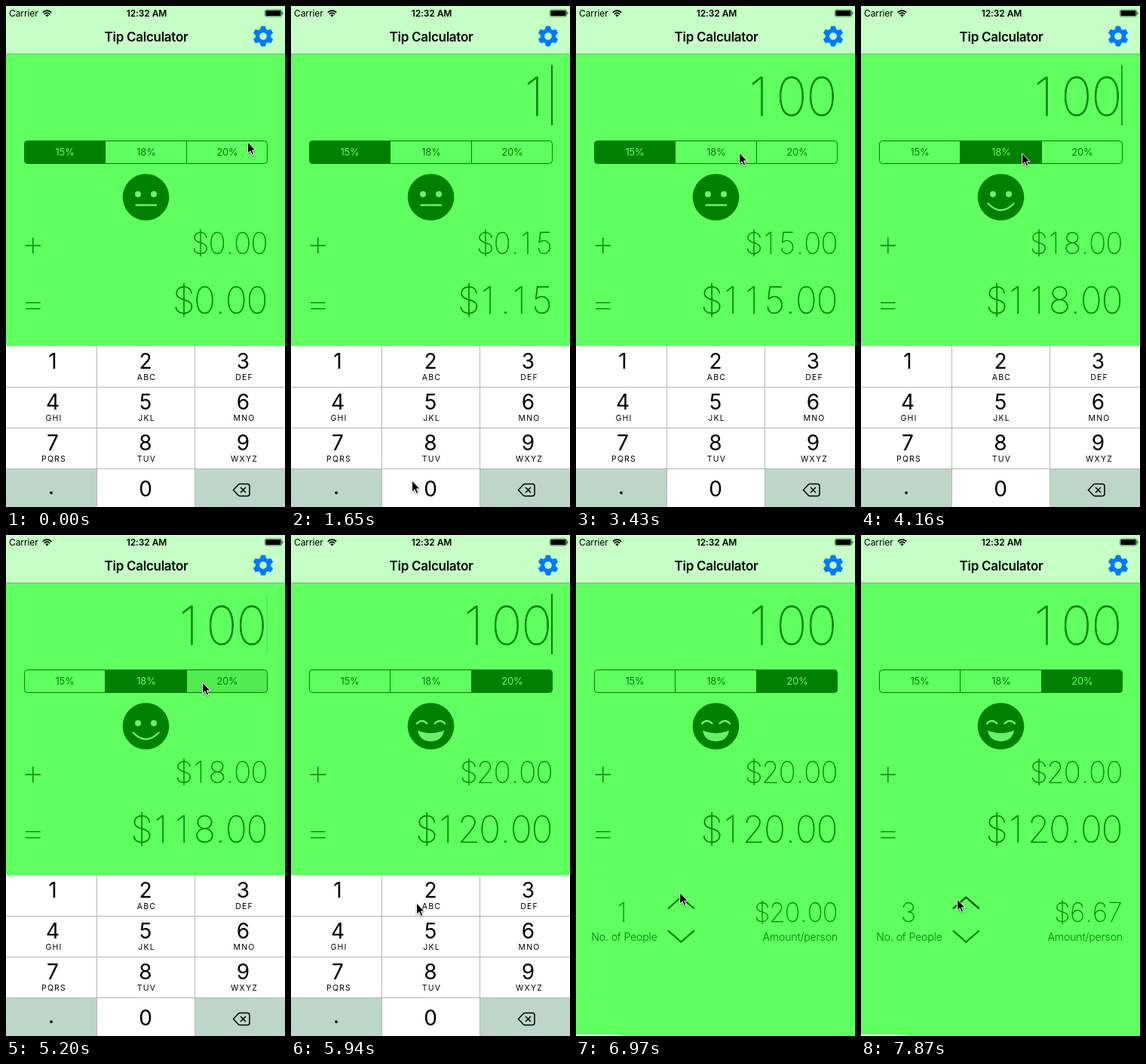
These frames come from a looping animation (370 by 663 pixels, 8 s). An HTML page:

```html
<!DOCTYPE html>
<html lang="en">
<head>
<meta charset="utf-8">
<title>Tip Calculator</title>
<style>
  html, body { margin: 0; width: 100%; height: 100%; overflow: hidden; background: #5eff5e; }
  svg { display: block; width: 370px; height: 663px; font-family: Inter, Roboto, sans-serif; }
  .thin {
    font-weight: 100; font-optical-sizing: none; text-anchor: middle;
    fill: #008000; stroke: #008000; stroke-width: .011em;
  }
  .mid { text-anchor: middle; }
  .line { fill: none; stroke: #008000; }
  .face { fill: none; stroke: #69f069; stroke-width: 2.4; stroke-linecap: round; }
</style>
</head>
<body>
<svg id="stage" viewBox="0 0 370 663"></svg>
<script>
const LOOP = 8000;
const GREEN = '#008000', BACK = '#5eff5e', SHADE = '#bdd6c8';
const stage = document.getElementById('stage');

function add(parent, tag, attrs = {}, text = '') {
  const el = document.createElementNS('http://www.w3.org/2000/svg', tag);
  set(el, attrs);
  el.textContent = text;
  return parent.appendChild(el);
}
function set(el, attrs) {
  for (const k in attrs) el.setAttribute(k, attrs[k]);
}
const group = (parent, attrs) => add(parent, 'g', attrs);
const path = (parent, d, attrs) => add(parent, 'path', { d, ...attrs });
const rect = (parent, x, y, width, height, fill, more) =>
  add(parent, 'rect', { x, y, width, height, fill, ...more });
const label = (parent, text, x, y, size, attrs) =>
  add(parent, 'text', { x, y, 'font-size': size, ...attrs }, text);
const show = (el, on) => { el.style.display = on ? '' : 'none'; };

// Right-aligned figures in fixed cells; the 1 sits left of its cell's centre
function figure(right, y, em) {
  const el = add(stage, 'text', { y, class: 'thin', 'font-size': em * .97 });
  const width = c => em * (c === '.' ? .278 : .556);
  const shift = c => (c === '1' ? -.05 * em : 0);
  return text => {
    let x = right - [...text].reduce((sum, c) => sum + width(c), 0);
    const xs = [...text].map(c => {
      x += width(c);
      return (x - width(c) / 2 + shift(c)).toFixed(1);
    });
    el.setAttribute('x', xs.join(' '));
    el.textContent = text;
  };
}

rect(stage, 0, 0, 370, 663, BACK);

// Status and title bars
rect(stage, 0, 0, 370, 63, '#c5ffc5');
rect(stage, 0, 63, 370, 1, '#6cbf6c');
label(stage, 'Carrier', 4, 13.5, 12, { 'letter-spacing': -.1 });
path(stage, 'M48.8 8.6Q54.5 3.4 60.2 8.6M50.8 10.8Q54.5 7.4 58.2 10.8',
  { fill: 'none', stroke: '#000', 'stroke-width': 1.7 });
path(stage, 'M52.4 12.2Q54.5 10.4 56.6 12.2L54.5 14.4Z');
label(stage, '12:32 AM', 186.5, 13.5, 12, { class: 'mid', 'font-weight': 600, 'letter-spacing': -.1 });
rect(stage, 343.5, 5, 22, 9, 'none', { rx: 2, stroke: '#3c4e3c', 'stroke-width': .8 });
rect(stage, 344.5, 6, 20, 7, '#000', { rx: 1 });
path(stage, 'M366.5 7.5Q368.5 9.5 366.5 11.5Z');
label(stage, 'Tip Calculator', 186, 47, 17, { class: 'mid', 'font-weight': 600, 'letter-spacing': -.28 });

const gear = group(stage, { transform: 'translate(341 40)', fill: '#007aff' });
add(gear, 'circle', { r: 7.5, fill: 'none', stroke: '#007aff', 'stroke-width': 5.4 });
for (let a = 0; a < 360; a += 60)
  path(gear, 'M-4.2 -8.8L-3.2 -12.6Q-3 -13.5 -2.2 -13.5H2.2Q3 -13.5 3.2 -12.6L4.2 -8.8Z',
    { transform: `rotate(${a})` });

// Bill amount
const amount = figure(346, 144.5, 72);
const caret = rect(stage, 345, 78, 2, 80, GREEN);

// Tip choice
const segX = [24.5, 131.5, 239.5, 346.5];
const segs = ['15%', '18%', '20%'].map((text, i) => {
  const l = segX[i], r = segX[i + 1];
  const d = i === 0 ? `M${r} 178.5V208.5H${l + 4}q-4 0 -4 -4V182.5q0 -4 4 -4Z`
    : i === 2 ? `M${l} 178.5V208.5H${r - 4}q4 0 4 -4V182.5q0 -4 -4 -4Z`
    : `M${l} 178.5H${r}V208.5H${l}Z`;
  return {
    box: path(stage, d, { stroke: GREEN }),
    text: label(stage, text, [78, 186, 293.5][i], 198, 13, { class: 'mid', 'letter-spacing': -.2 })
  };
});

// Mood
add(stage, 'circle', { cx: 185.5, cy: 253, r: 30.8, fill: GREEN });
const eyes = group(stage, { fill: '#69f069' });
for (const cx of [175, 196]) add(eyes, 'circle', { cx, cy: 249, r: 4 });
const moods = [
  'M172.5 263.5H199',
  'M168.5 261.5Q185.5 279 202.5 261.5',
  'M167 249.5Q173.5 242.5 180.5 249.5M190.5 249.5Q197.5 242.5 204 249.5'
].map(d => {
  const g = group(stage, { class: 'face' });
  path(g, d);
  return g;
});
path(moods[2], 'M168 258.5Q185.5 266 203 258.5Q200.5 273 185.5 273Q170.5 273 168 258.5Z',
  { fill: '#69f069', stroke: 'none' });

// Totals
path(stage, 'M25.5 317H46M35.8 306.5V327.5M26 392.6H45.5M26 400.6H45.5',
  { class: 'line', 'stroke-width': 1.4 });
const tip = figure(347, 328.3, 40);
const total = figure(347, 407.3, 50);

// Split
const people = figure(73, 512.3, 36);
const share = figure(347, 512.3, 36);
label(stage, 'No. of People', 64, 537, 14, { class: 'mid', fill: GREEN, 'font-weight': 300, 'letter-spacing': -.1 });
label(stage, 'Amount/person', 347, 537, 14,
  { 'text-anchor': 'end', fill: GREEN, 'font-weight': 300, 'letter-spacing': -.1 });
const up = path(stage, 'M122 494.5L139.3 479.5L156.8 494.5', { class: 'line', 'stroke-width': 2.3 });
path(stage, 'M122 523.5L139.3 538.5L156.8 523.5', { class: 'line', 'stroke-width': 2.3 });
path(stage, 'M0 661H44Q56 661.5 62 663H0Z', { fill: '#fff' });

// Keypad
const pad = group(stage);
rect(pad, 0, 450, 370, 213, '#fff');
rect(pad, 0, 613, 120, 50, SHADE);
rect(pad, 251, 613, 119, 50, SHADE);
const zero = rect(pad, 121, 613, 129, 50, SHADE);
for (const y of [504, 558, 612]) rect(pad, 0, y, 370, 1, '#b4b8b6');
for (const x of [120, 250]) rect(pad, x, 450, 1, 213, '#b4b8b6');
const keyX = [62, 185, 314.5];
['', 'ABC', 'DEF', 'GHI', 'JKL', 'MNO', 'PQRS', 'TUV', 'WXYZ'].forEach((text, i) => {
  const x = keyX[i % 3], y = 479.5 + 54 * Math.floor(i / 3);
  label(pad, i + 1, x, y, 28, { class: 'mid' });
  label(pad, text, x + 1.5, y + 15.5, 10.5, { class: 'mid', 'letter-spacing': 1.2 });
});
label(pad, '0', 185, 649, 28, { class: 'mid' });
label(pad, '.', 60, 646, 28, { class: 'mid' });
path(pad, 'M301.5 640.5L308 633.5Q309 632.5 310.5 632.5H320Q323 632.5 323 635.5V645.5Q323 648.5 320 648.5H310.5Q309 648.5 308 647.5ZM311 637L318 644M318 637L311 644',
  { fill: 'none', stroke: '#000', 'stroke-width': 1.5 });

const pointer = path(stage, 'M.5 0V15L4 11.8L6.3 17.2L8.8 16.1L6.5 10.9H11Z',
  { fill: '#000', stroke: '#fff', 'stroke-width': 1, style: 'filter:drop-shadow(0 1px 1px #0006)' });

// Bursts of screen updates: start, end, count
const bursts = [
  [300, 900, 5], [1200, 2100, 7], [2550, 2700, 2], [2990, 4010, 8],
  [4160, 4750, 5], [5050, 6080, 8], [6230, 7270, 8], [7420, 7870, 4]
];
const ticks = [0];
for (const [a, b, n] of bursts)
  for (let i = 0; i < n; i++) ticks.push(Math.round((a + (b - a) * i / (n - 1)) / 10) * 10);

const steps = [
  [0, { bill: '', seg: 0, press: -1, key: false, heads: 1, up: false }],
  [1200, { bill: '1' }],
  [1800, { key: true }],
  [1950, { bill: '10' }],
  [2100, { key: false }],
  [2550, { bill: '100', key: true }],
  [2700, { key: false }],
  [3720, { press: 1 }],
  [3860, { seg: 1, press: -1 }],
  [5050, { press: 2 }],
  [5340, { seg: 2, press: -1 }],
  [7420, { heads: 2, up: true }],
  [7570, { up: false }],
  [7720, { up: true }],
  [7870, { heads: 3 }]
];
const route = [
  [150, 320, 180], [750, 115, 533], [900, 99, 482], [1200, 99, 482], [1620, 160, 628],
  [2850, 160, 628], [3430, 216, 194], [3860, 212, 195], [4100, 212, 195], [4750, 260, 195],
  [5340, 260, 195], [5930, 166, 487], [6080, 164, 450], [6400, 164, 450], [7270, 127, 482]
];
const blink = [
  [300, 0], [420, 1], [2950, 1], [3120, 0], [3570, 0], [3720, 1], [4100, 1], [4300, 0],
  [4600, 0], [4700, 1], [5050, 1], [5220, 0], [5600, 0], [5750, 1], [6200, 1], [6300, 0]
];

function along(keys, t, ease = p => p) {
  const i = keys.findIndex(k => k[0] > t);
  if (i === 0) return keys[0].slice(1);
  if (i < 0) return keys[keys.length - 1].slice(1);
  const [a, b] = [keys[i - 1], keys[i]];
  const p = ease((t - a[0]) / (b[0] - a[0]));
  return a.slice(1).map((v, n) => v + (b[n + 1] - v) * p);
}
const smooth = p => p * p * (3 - 2 * p);
const money = v => '$' + v.toFixed(2);

function draw(t) {
  const s = Object.assign({}, ...steps.filter(k => k[0] <= t).map(k => k[1]));
  const bill = Number(s.bill), extra = bill * [.15, .18, .2][s.seg];
  amount(s.bill);
  tip(money(extra));
  total(money(bill + extra));
  people(String(s.heads));
  share(money(extra / s.heads));
  segs.forEach(({ box, text }, i) => {
    set(box, { fill: i === s.seg ? GREEN : i === s.press ? '#50eb50' : 'none' });
    set(text, { fill: i === s.seg ? BACK : GREEN });
  });
  moods.forEach((m, i) => show(m, i === s.seg));
  show(eyes, s.seg < 2);
  show(zero, s.key);
  up.style.stroke = s.up ? '#004d00' : '';
  caret.style.opacity = along(blink, t)[0];
  const p = Math.min(1, Math.max(0, (t - 6220) / 264));
  set(pad, { transform: `translate(0 ${213 * (1 - (1 - p) ** 2)})` });
  set(pointer, { transform: `translate(${along(route, t, smooth)})` });
}

let last = -1;
const start = performance.now();
function frame() {
  const t = (performance.now() - start) % LOOP;
  const held = ticks.filter(k => k <= t).pop() ?? 0;
  if (held !== last) draw(last = held);
  requestAnimationFrame(frame);
}
draw(0);
frame();
</script>
</body>
</html>
```
